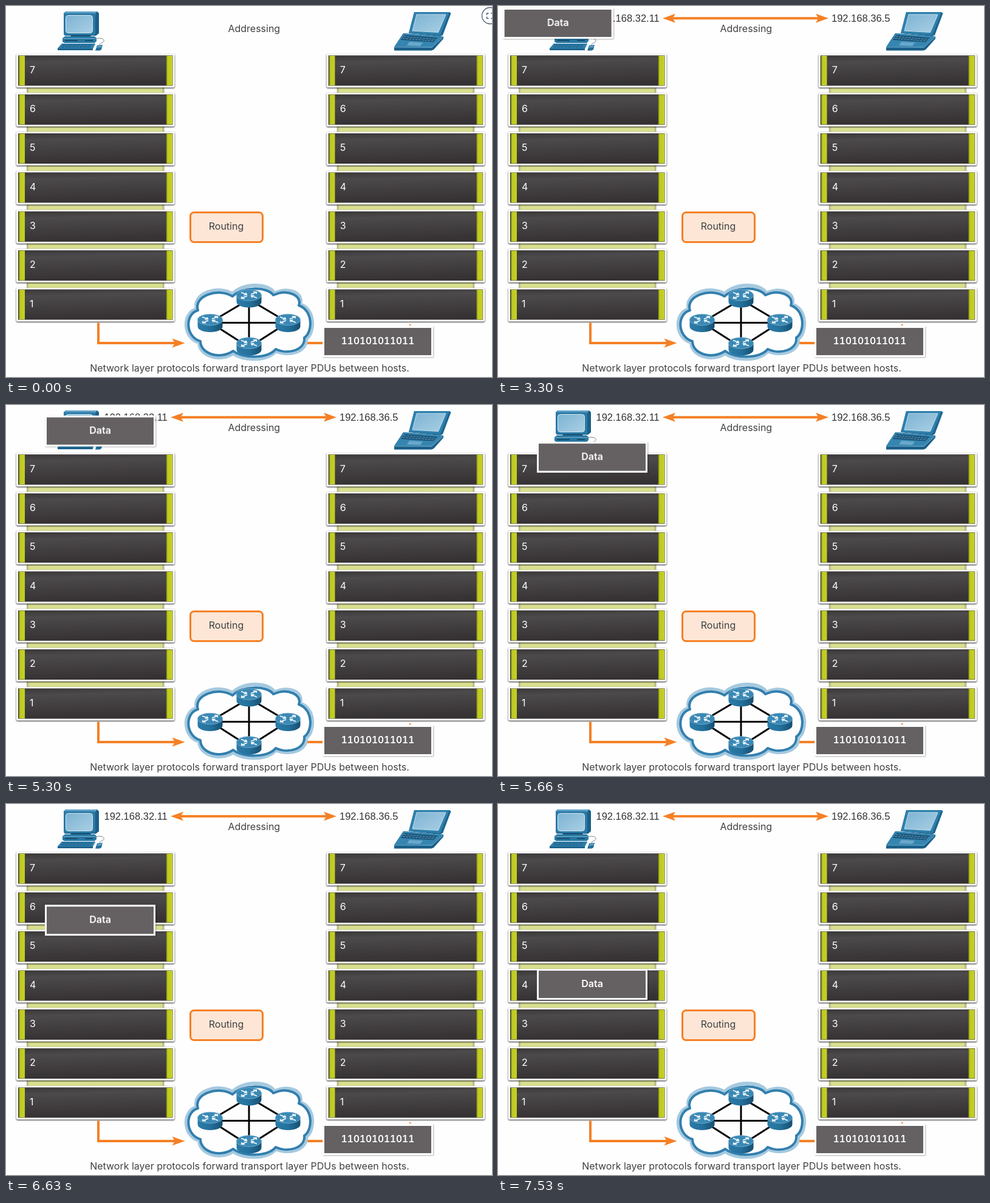
An HTML page that plays this animation: 800 by 612 pixels, repeating every 8000 ms.

```html
<!DOCTYPE html>
<html lang="en">
<head>
<meta charset="utf-8">
<title>Network layer</title>
<style>
  html, body { margin: 0; width: 100%; height: 100%; overflow: hidden; background: #fefefe; }
  svg { display: block; width: 800px; height: 612px; }
  text { font: 16px Inter, "Open Sans", sans-serif; fill: #414042; }
  .mid { text-anchor: middle; }
  .num text { fill: #fff; }
  .bold { font-weight: 600; fill: #fff; }
  .bits { font-size: 15.5px; font-variant-numeric: tabular-nums; }
  .ip { font: 16.5px "Liberation Sans", Arial, sans-serif; fill: #333; }
  .frame { filter: drop-shadow(0 1.5px 1.2px rgba(0, 0, 0, .85)); }
  .plate { filter: drop-shadow(1px 1px 1px rgba(0, 0, 0, .3)); }
  .addresses { animation: appear 8s step-end infinite; }
  .expand { animation: vanish 8s step-end infinite; }
  .data { animation: fade 8s linear infinite, travel 8s linear infinite; }

  @keyframes appear { 0% { opacity: 0 } 5.75% { opacity: .5 } 6.625%, 100% { opacity: 1 } }
  @keyframes vanish { 0% { opacity: 1 } 5.75% { opacity: .5 } 6.625%, 100% { opacity: 0 } }
  @keyframes fade {
    0% { opacity: 0 }
    21.9375% { opacity: 0; animation-timing-function: steps(18) }
    31.5625%, 100% { opacity: 1 }
  }
  /* right in two stretches, then down the stack in three */
  @keyframes travel {
    0% { transform: translate(0, 0) }
    40.6875% { transform: translate(0, 0); animation-timing-function: steps(20) }
    50.6875% { transform: translate(33.5px, 0) }
    51.4125% { transform: translate(33.5px, 0); animation-timing-function: steps(14) }
    58.6875% { transform: translate(58px, 0) }
    64.3125% { transform: translate(58px, 0); animation-timing-function: steps(20) }
    74.9375% { transform: translate(58px, 96px) }
    75.1625% { transform: translate(58px, 96px); animation-timing-function: steps(20) }
    85.6875% { transform: translate(58px, 192px) }
    86.025% { transform: translate(58px, 192px); animation-timing-function: steps(15) }
    94.0625%, 100% { transform: translate(58px, 269px) }
  }
</style>
</head>
<body>
<svg viewBox="0 0 800 612" xmlns="http://www.w3.org/2000/svg">
  <defs>
    <linearGradient id="panel" x1="0" y1="0" x2=".12" y2="1">
      <stop offset="0" stop-color="#3b3839"/>
      <stop offset=".22" stop-color="#4d4a4b"/>
      <stop offset="1" stop-color="#363233"/>
    </linearGradient>
    <linearGradient id="strip">
      <stop offset="0" stop-color="#6f7715"/>
      <stop offset=".25" stop-color="#bfcb22"/>
      <stop offset="1" stop-color="#c3cf24"/>
    </linearGradient>
    <linearGradient id="spine">
      <stop offset="0" stop-color="#a9ac86"/>
      <stop offset=".02" stop-color="#d9df8e"/>
      <stop offset=".98" stop-color="#d9df8e"/>
      <stop offset="1" stop-color="#a9ac86"/>
    </linearGradient>
    <linearGradient id="screen" x1="0" y1="0" x2="1" y2="1">
      <stop offset="0" stop-color="#7db3d3"/>
      <stop offset="1" stop-color="#a9cfe4"/>
    </linearGradient>
    <linearGradient id="drum">
      <stop offset="0" stop-color="#2b7ba8"/>
      <stop offset=".5" stop-color="#24719c"/>
      <stop offset="1" stop-color="#164f72"/>
    </linearGradient>

    <g id="layer">
      <rect class="frame" x="17" y="79" width="260.5" height="55.5" rx="2" fill="#fff"/>
      <rect x="20" y="81.5" width="254.5" height="50" fill="#343132"/>
      <rect x="21" y="82" width="10" height="49" fill="url(#strip)"/>
      <rect x="263.5" y="82" width="10.5" height="49" fill="url(#strip)"/>
      <rect x="31" y="82" width="232.5" height="49" fill="url(#panel)"/>
    </g>

    <g id="stack" class="num">
      <rect x="34" y="120" width="226.5" height="360" fill="url(#spine)"/>
      <use href="#layer"/><text x="39" y="110.8">7</text>
      <use href="#layer" y="64.3"/><text x="39" y="175.1">6</text>
      <use href="#layer" y="128.6"/><text x="39" y="239.4">5</text>
      <use href="#layer" y="193"/><text x="39" y="303.8">4</text>
      <use href="#layer" y="257.3"/><text x="39" y="368.1">3</text>
      <use href="#layer" y="321.6"/><text x="39" y="432.4">2</text>
      <use href="#layer" y="386"/><text x="39" y="496.8">1</text>
    </g>

    <g id="router">
      <path d="M-20.5 -6V5A20.5 9.5 0 0 0 20.5 5V-6Z" fill="url(#drum)"/>
      <ellipse cy="-6" rx="20.5" ry="9.3" fill="#3a89b5" stroke="#7fb2d0" stroke-width=".8"/>
      <g fill="none" stroke="#fff" stroke-width="1.7">
        <path d="M-13 -10.5L-4 -7.2M13 -1.5L4 -4.8M3 -7.2L12 -10.8M-3 -4.8L-12 -1.2"/>
        <path d="M-8.5 -6.2L-3.5 -7L-5.5 -10M8.5 -5.8L3.5 -5L5.5 -2M7 -11.5L12.5 -11L12 -8M-7 -.5L-12.5 -1L-12 -4" stroke-width="1.4"/>
      </g>
    </g>

    <path id="head" d="M0 0L-21 -7.5L-16.5 0L-21 7.5Z" fill="#f58025"/>
    <rect id="plate" class="plate" x="7.5" y="4.5" width="179" height="48" fill="#656162" stroke="#fff" stroke-width="3"/>
  </defs>

  <rect width="800" height="612" fill="#fefefe"/>

  <!-- desktop -->
  <g>
    <path d="M95 12L98 9H150L153 12V45L148 49H97L95 46Z" fill="#1b5f88"/>
    <path d="M95 12L98 9H150L147 13Z" fill="#5c9fc6"/>
    <rect x="95" y="12" width="52" height="36" rx="2" fill="#2b7aa6"/>
    <rect x="98.5" y="15.5" width="44" height="29" rx="4" fill="url(#screen)" stroke="#d2e6f1"/>
    <path d="M108 48H138L141 51H105Z" fill="#154b6d"/>
    <path d="M97 50H146L149 53V58L146 61H96L93 59V53Z" fill="#2878a3"/>
    <path d="M94 53.5H147" stroke="#7db1cf"/>
    <path d="M97 57H118M130 57H143" stroke="#123f5c" stroke-width="1.5"/>
    <path d="M92 62H147L143 70V73H85V70Z" fill="#1c648e"/>
    <path d="M92 62H147L143 70H85Z" fill="#2f80ac"/>
    <path d="M93 64.5H142M91 67.5H140" stroke="#164f73" stroke-width="1.2" stroke-dasharray="5 1"/>
    <path d="M147 55C153 51 163 54 161 58C159 62 154 60 154 65" fill="none" stroke="#7a8790"/>
    <path d="M150 65L159 64L157 72L154 73.5H147Z" fill="#236f9a"/>
    <path d="M151 66L158 65L157 68L149 69Z" fill="#5fa1c6"/>
  </g>

  <!-- laptop -->
  <g>
    <path d="M672 10H730L732.5 12L719 48L715 50L663 45Z" fill="#1d658f"/>
    <path d="M672 10H730L715 48L663 44.5Z" fill="#2f80ac"/>
    <path d="M676 14H724L711.5 43.5L669 41Z" fill="url(#screen)" stroke="#c4deec"/>
    <path d="M654 45L720 50.5V54L704 72L700 73.5H639V68Z" fill="#1a5f88"/>
    <path d="M654 45L720 50.5L701 69L639 67.5Z" fill="#3585b0"/>
    <path d="M656 48L711 52.5L704 59.5L650 56Z" fill="#174f73"/>
    <path d="M655 50.5L709 55M653 53.5L706 57.5" stroke="#6aa8cb" stroke-dasharray="4 1.2"/>
    <path d="M664 59L686 60.5L682 66L660 65Z" fill="#6aa8cb"/>
    <path d="M639 68H701L719 52" fill="none" stroke="#83b6d3" stroke-width=".8"/>
  </g>

  <use href="#stack"/>
  <use href="#stack" x="510.7"/>

  <!-- links to the cloud -->
  <path d="M152 522.5V556H280M495 556H526" fill="none" stroke="#f58025" stroke-width="4"/>
  <use href="#head" x="294.5" y="556"/>
  <rect x="664" y="525" width="2.5" height="2" fill="#f58025"/>

  <g stroke-linejoin="round">
    <path id="cloud" d="M314 500C306 474 350 460 373 475C388 457 432 456 442 474C466 462 490 474 484 492C510 500 508 540 494 549C496 570 466 579 444 569C432 586 390 586 374 573C352 588 318 577 318 555C291 548 290 506 314 500Z" fill="#fff" stroke="#a5c9df" stroke-width="6"/>
    <path d="M316 502C308 478 350 464 373 479C388 463 430 462 440 477C464 466 488 478 482 494C506 502 505 538 491 547C493 567 465 576 444 566C432 582 390 582 374 569C352 584 320 574 320 553C295 546 294 508 316 502Z" fill="#fefefe" stroke="#327fae" stroke-width="4"/>
  </g>
  <path d="M400 484L336 522L400 563L464 522ZM400 484V563M336 522.5H464" fill="none" stroke="#000" stroke-width="3"/>
  <use href="#router" x="400" y="483"/>
  <use href="#router" x="336" y="523.5"/>
  <use href="#router" x="464" y="523.5"/>
  <use href="#router" x="400" y="562"/>

  <rect x="303.5" y="340.5" width="119" height="49" rx="6" fill="#fde6d6" stroke="#f58025" stroke-width="3"/>
  <text class="mid" x="362.5" y="369">Routing</text>
  <text class="mid" x="408.3" y="43">Addressing</text>
  <text class="mid" x="401" y="603">Network layer protocols forward transport layer PDUs between hosts.</text>

  <use href="#plate" x="515" y="525"/>
  <text class="mid bold bits" x="612" y="557.7">110101011011</text>

  <g class="addresses">
    <text class="ip" x="161.5" y="26">192.168.32.11</text>
    <text class="ip" x="549" y="26">192.168.36.5</text>
    <path d="M285 20.3H531" stroke="#f58025" stroke-width="4"/>
    <use href="#head" x="544" y="20.3"/>
    <use href="#head" transform="translate(271 20.3) scale(-1 1)"/>
  </g>

  <g class="expand" fill="none" stroke="#4d5b75">
    <circle cx="797" cy="16" r="13.5" fill="#fff" stroke-width="1.3"/>
    <path d="M791.5 15V12H794.5M791.5 17.5V20.5H794.5M798 12H801M798 20.5H801" stroke-width="1.4"/>
  </g>

  <g class="data">
    <use href="#plate"/>
    <text class="mid bold" x="97" y="32.8">Data</text>
  </g>
</svg>
</body>
</html>
```
